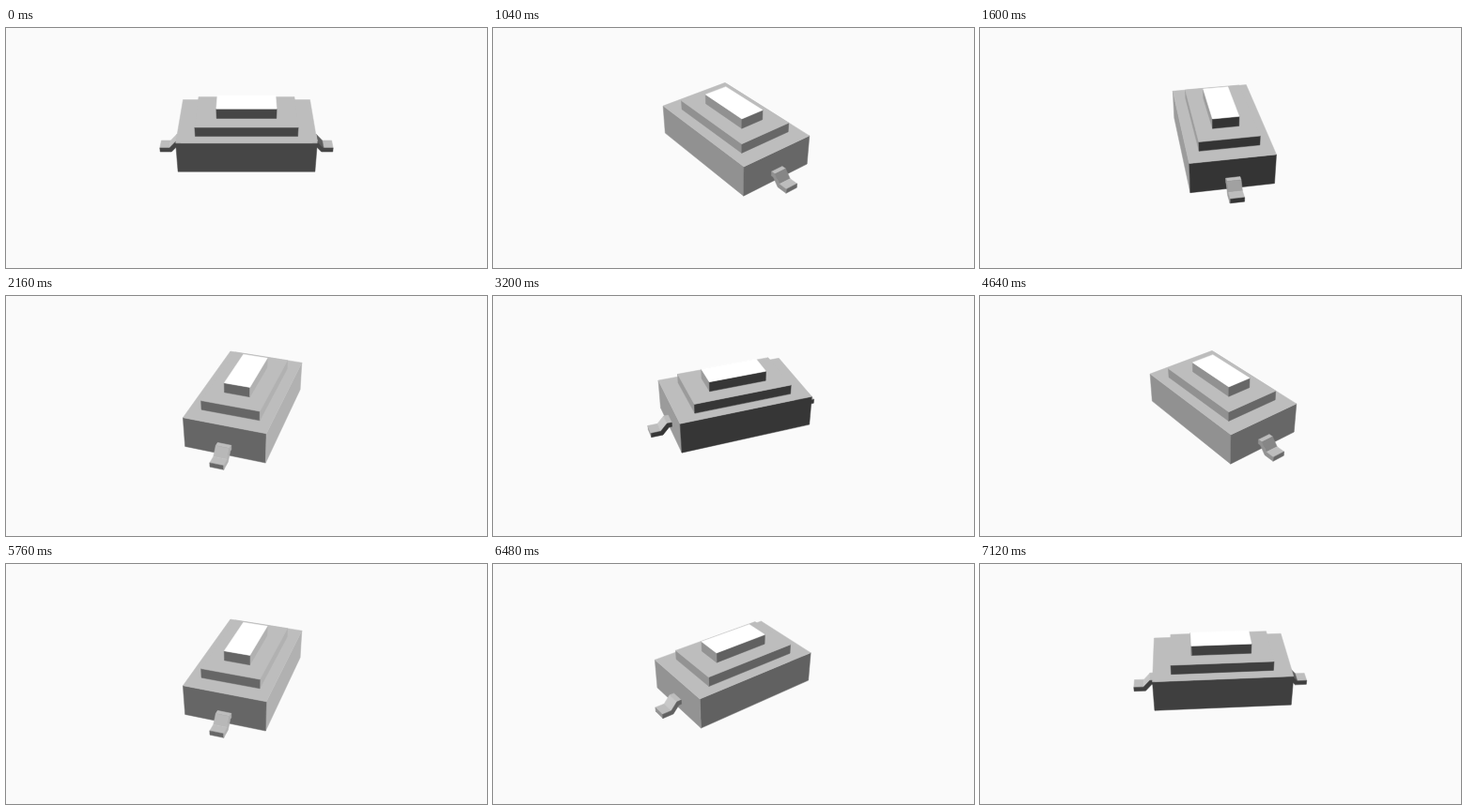
Write an HTML page with a canvas that moves like this. It is 512 by 256 pixels and loops after 7200 ms.

```html
<!DOCTYPE html>
<html lang="en">
<head>
<meta charset="utf-8">
<title>Push button turntable</title>
<style>
  html, body { margin: 0; width: 100%; height: 100%; overflow: hidden; background: #fafafa; }
  canvas { display: block; width: 512px; height: 256px; }
</style>
</head>
<body>
<canvas id="stage" width="512" height="256"></canvas>
<script>
const ctx = document.getElementById('stage').getContext('2d');
const LOOP = 7200, STEP = 80, TURNS = LOOP / STEP;
const RAD = Math.PI / 180;
const DIST = 643, TILT = 35 * RAD;
const SIN_T = Math.sin(TILT), COS_T = Math.cos(TILT);
const TOP = 189;

// half length, half width, bottom, top
const BODY = [69, 41.7, 0, 35];
const PLATE = [50.8, 29.8, 35, 45.6];
const KNOB = [30, 13.2, 45.6, 56.7];

// Lead outline as [x, z], clockwise from the body outwards
const LEAD = [[69, 13], [74, 13], [81, 5], [91, 5], [91, 0], [79, 0], [72, 8], [69, 8]];
const LEAD_HALF = 7;

let angle = 0;

const sin = deg => Math.sin(deg * RAD);
const cos = deg => Math.cos(deg * RAD);
const grey = v => `rgb(${[v, v, v].map(Math.round)})`;

// Shade of an upright face; dir 0 looks at the viewer, 90 to the left
const sideShade = dir =>
  48 + 108 * Math.max(0, sin(dir + 12)) + 160 * Math.max(0, sin(-dir - 18));

const rampShade = dir => 145 + 50 * sin(dir) + 25 * cos(dir);

function project([x, y, z]) {
  const px = x * cos(angle) - y * sin(angle);
  const py = x * sin(angle) + y * cos(angle);
  const near = py * COS_T + z * SIN_T;
  const k = DIST / (DIST - near);
  return { x: 256 + px * k, y: 128 - (z * COS_T - py * SIN_T) * k, near };
}

// Positive when the points run clockwise on screen
function area(pts) {
  return pts.reduce((sum, p, i) => {
    const q = pts[(i + 1) % pts.length];
    return sum + p.x * q.y - q.x * p.y;
  }, 0);
}

function face(corners, shade) {
  const pts = corners.map(project);
  if (area(pts) <= 0) return;
  ctx.beginPath();
  pts.forEach(p => ctx.lineTo(p.x, p.y));
  ctx.closePath();
  ctx.fillStyle = ctx.strokeStyle = grey(shade);
  ctx.fill();
  ctx.stroke();
}

function box([a, b, low, high], topShade) {
  const ring = [[-a, b], [a, b], [a, -b], [-a, -b]];
  ring.forEach(([x, y], i) => {
    const [u, v] = ring[(i + 1) % 4];
    face([[x, y, high], [u, v, high], [u, v, low], [x, y, low]], sideShade(angle - 90 * i));
  });
  face([[-a, -b, high], [a, -b, high], [a, b, high], [-a, b, high]], topShade);
}

// side is 1 for the right end, -1 for the left end
function lead(side) {
  const w = LEAD_HALF * side;
  const at = ([x, z], y) => [x * side, y, z];
  const out = angle - 90 * side;
  const shades = [TOP, rampShade(out), TOP, sideShade(out), 48, 48, 48];
  const depth = strip => strip.corners.reduce((sum, c) => sum + project(c).near, 0);

  shades
    .map((shade, i) => {
      const p = LEAD[i], q = LEAD[i + 1];
      return { shade, corners: [at(p, -w), at(q, -w), at(q, w), at(p, w)] };
    })
    .sort((m, n) => depth(m) - depth(n))
    .forEach(s => face(s.corners, s.shade));

  const cap = LEAD.map(p => at(p, w));
  const back = LEAD.map(p => at(p, -w)).reverse();
  const turn = side > 0 ? 0 : 180;
  face(cap, sideShade(angle + turn));
  face(back, sideShade(angle + turn + 180));
}

function endVisible(side) {
  const [a, b, low, high] = BODY;
  const x = a * side, y = b * side;
  return area([[x, y, high], [x, -y, high], [x, -y, low], [x, y, low]].map(project)) > 0;
}

function draw(time) {
  angle = Math.floor((time % LOOP) / STEP) * 360 / TURNS;
  ctx.fillStyle = '#fafafa';
  ctx.fillRect(0, 0, 512, 256);
  ctx.lineWidth = 0.5;
  ctx.lineJoin = 'round';

  const ends = [1, -1];
  ends.filter(s => !endVisible(s)).forEach(lead);
  box(BODY, TOP);
  ends.filter(endVisible).forEach(lead);
  box(PLATE, TOP);
  box(KNOB, 255);
}

const start = performance.now();
function tick() {
  draw(performance.now() - start);
  requestAnimationFrame(tick);
}
tick();
</script>
</body>
</html>
```
